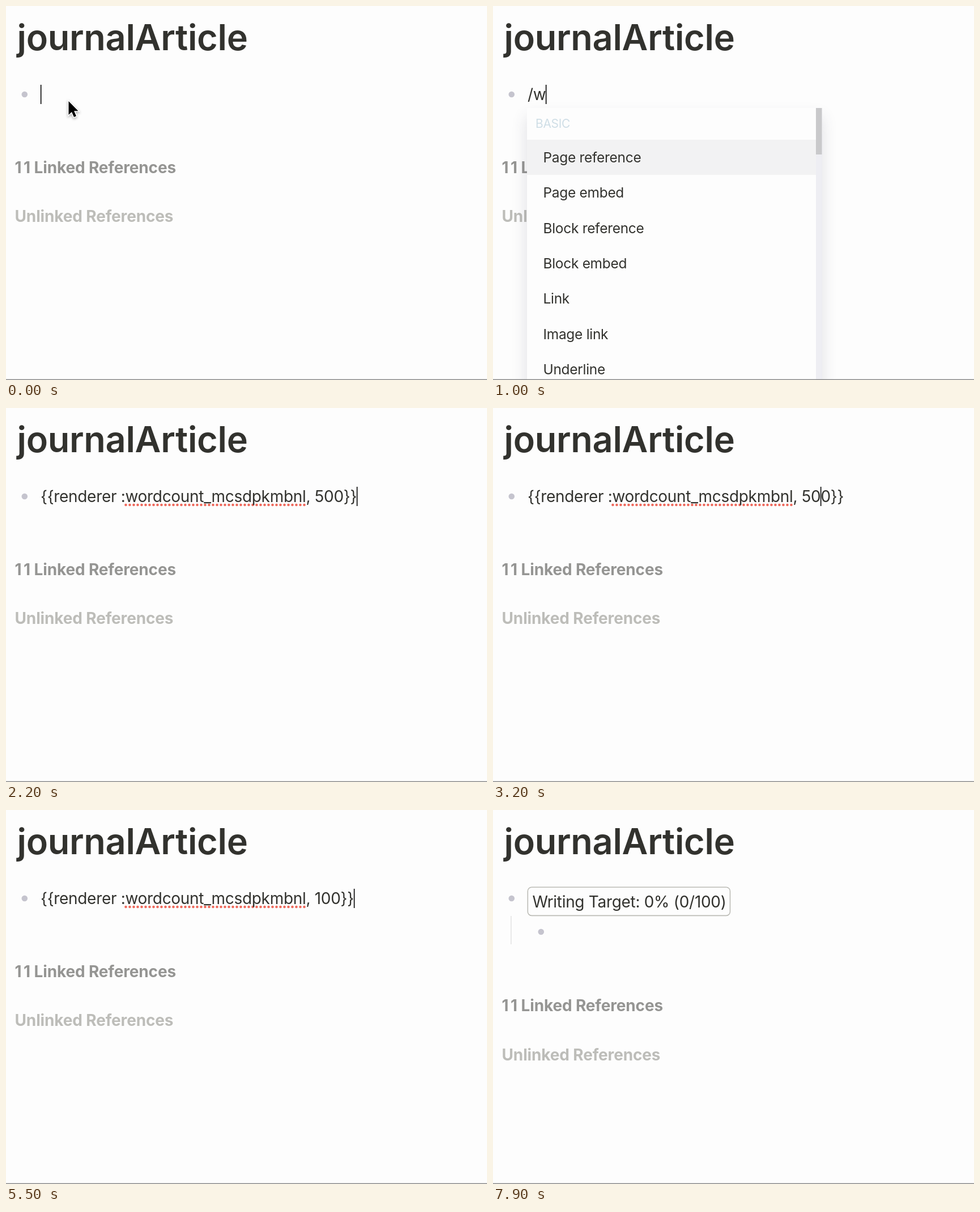
These frames come from a looping animation (849x660 px, 8 s). An HTML page with a canvas:

```html
<!DOCTYPE html>
<html lang="en">
<head>
<meta charset="utf-8">
<title>Writing target</title>
<style>
  html, body { margin: 0; width: 100%; height: 100%; overflow: hidden; background: #fdfdfd; }
  canvas { display: block; }
</style>
</head>
<body>
<canvas id="stage" width="849" height="660"></canvas>
<script>
const ctx = document.getElementById('stage').getContext('2d');
const W = 849, H = 660, LOOP = 8000, LEFT = 61;
const INK = '#32322e', BG = '#fdfdfd', BULLET = '#c5c4ce';
const TRACK = '-0.308px', HEADING_TRACK = '-0.15px';
const font = (weight, size) => `${weight} ${size}px Inter, "Liberation Sans", sans-serif`;
const BODY = font(400, 28), HEADING = font(700, 28);
const HEAD = '{{renderer :', WORD = 'wordcount_mcsdpkmbnl';
const macro = n => `${HEAD}${WORD}, ${n}}}`;
const MENU = ['Page reference', 'Page embed', 'Block reference', 'Block embed', 'Link', 'Image link', 'Underline'];

// Each step: start time, block text, caret distance from the end of the text.
const STEPS = [
  [0, '', 0], [300, '/', 0], [600, '/w', 0], [1300, '', 0],
  [2000, macro(500), 0], [2700, macro(500), 1], [2900, macro(500), 2],
  [3100, macro(500), 3], [3400, macro(500), 4],
  [3800, macro('00'), 4], [4100, macro(100), 4],
  [4700, macro(100), 3], [4900, macro(100), 2], [5100, macro(100), 1], [5300, macro(100), 0]
];
const MENU_ON = 400, MENU_OFF = 1300, ENTER = 6000, INDENT = 7350;

function text(str, x, y, style, color, track = TRACK, align = 'left') {
  ctx.font = style;
  ctx.letterSpacing = track;
  ctx.textAlign = align;
  ctx.fillStyle = color;
  ctx.fillText(str, x, y);
}

function widthOf(str) {
  ctx.font = BODY;
  ctx.letterSpacing = TRACK;
  return ctx.measureText(str).width;
}

function dot(x, y, r, color) {
  ctx.fillStyle = color;
  ctx.beginPath();
  ctx.arc(x, y, r, 0, Math.PI * 2);
  ctx.fill();
}

function rect(x, y, w, h, color) {
  ctx.fillStyle = color;
  ctx.fillRect(x, y, w, h);
}

function caret(x, y, age) {
  if (age % 1000 < 500) rect(Math.round(x) - 0.2, y, 1.75, 34, '#151515');
}

function spelling() {
  const start = LEFT + widthOf(HEAD), end = start + widthOf(WORD);
  for (let x = start + 1; x < end - 2; x += 7) dot(x, 171, 2.3, '#ee6a5d');
}

function pointer(x, y) {
  const pts = [[0, 0], [0, 24], [5.5, 19], [9.5, 28], [13.5, 26.2], [9.6, 17.2], [17, 17.2]];
  ctx.save();
  ctx.translate(x, y);
  ctx.beginPath();
  pts.forEach(p => ctx.lineTo(...p));
  ctx.closePath();
  ctx.shadowColor = 'rgba(0,0,0,.35)';
  ctx.shadowBlur = 4;
  ctx.shadowOffsetY = 2;
  ctx.lineWidth = 3;
  ctx.strokeStyle = '#fff';
  ctx.stroke();
  ctx.shadowColor = 'transparent';
  ctx.fillStyle = '#000';
  ctx.fill();
  ctx.restore();
}

function menu() {
  ctx.save();
  ctx.shadowColor = 'rgba(60,60,90,.16)';
  ctx.shadowBlur = 26;
  ctx.shadowOffsetY = 16;
  rect(60, 180, 520, 520, BG);
  ctx.restore();
  text('BASIC', 75, 215, font(400, 21), '#cfdee6');
  rect(60, 236, 510, 62, '#f2f2f3');
  MENU.forEach((name, i) => text(name, 88.5, 276 + i * 62.35, font(400, 24.5), INK));
  rect(570, 180, 10.5, 480, '#eeeef3');
  rect(570, 180, 10.5, 82, '#c9c9cb');
}

function target() {
  ctx.strokeStyle = '#bcbcb6';
  ctx.lineWidth = 1.6;
  ctx.beginPath();
  ctx.roundRect(61.3, 136.2, 357.2, 50.2, 7);
  ctx.stroke();
  text('Writing Target: 0% (0/100)', 69.5, 171.5, BODY, INK);
}

function headings(shift) {
  const y = 294.5 + shift, gray = '#959593';
  // The count is set without the tight kerning of its two digits.
  text('1', 15.5, y, HEADING, gray, HEADING_TRACK);
  text('1 Linked References', 300, y, HEADING, gray, HEADING_TRACK, 'right');
  text('Unlinked References', 15.5, y + 86.5, HEADING, '#bdbdb9', HEADING_TRACK);
}

function draw(t) {
  rect(0, 0, W, H, BG);
  const done = t >= ENTER;

  text('journalArticle', 19.5, 78, font(600, 63), INK);
  headings(done ? 60.5 : 0);
  dot(32.8, 156, 5.3, BULLET);

  if (done) {
    target();
    const nested = t >= INDENT;
    const x = nested ? 84.8 : 32.8, y = nested ? 215 : 216.5;
    if (nested) rect(31, 187, 1.75, 50, '#e6e6e6');
    dot(x, y, 5.3, BULLET);
    caret(x + 28.5, y - 17, t - (nested ? INDENT : ENTER));
  } else {
    const [since, str, back] = STEPS.findLast(s => s[0] <= t);
    if (str.startsWith(HEAD)) spelling();
    text(str, LEFT, 166, BODY, INK);
    caret(LEFT + widthOf(str.slice(0, str.length - back)), 139, t - since);
    if (t >= MENU_ON && t < MENU_OFF) menu();
    if (t < 300) pointer(110.5, 168);
  }
  rect(0, 658.6, W, 1.4, '#858585');
}

const begin = performance.now();
function tick(now) {
  draw(Math.max(0, now - begin) % LOOP);
  requestAnimationFrame(tick);
}
draw(0);
requestAnimationFrame(tick);
</script>
</body>
</html>
```
